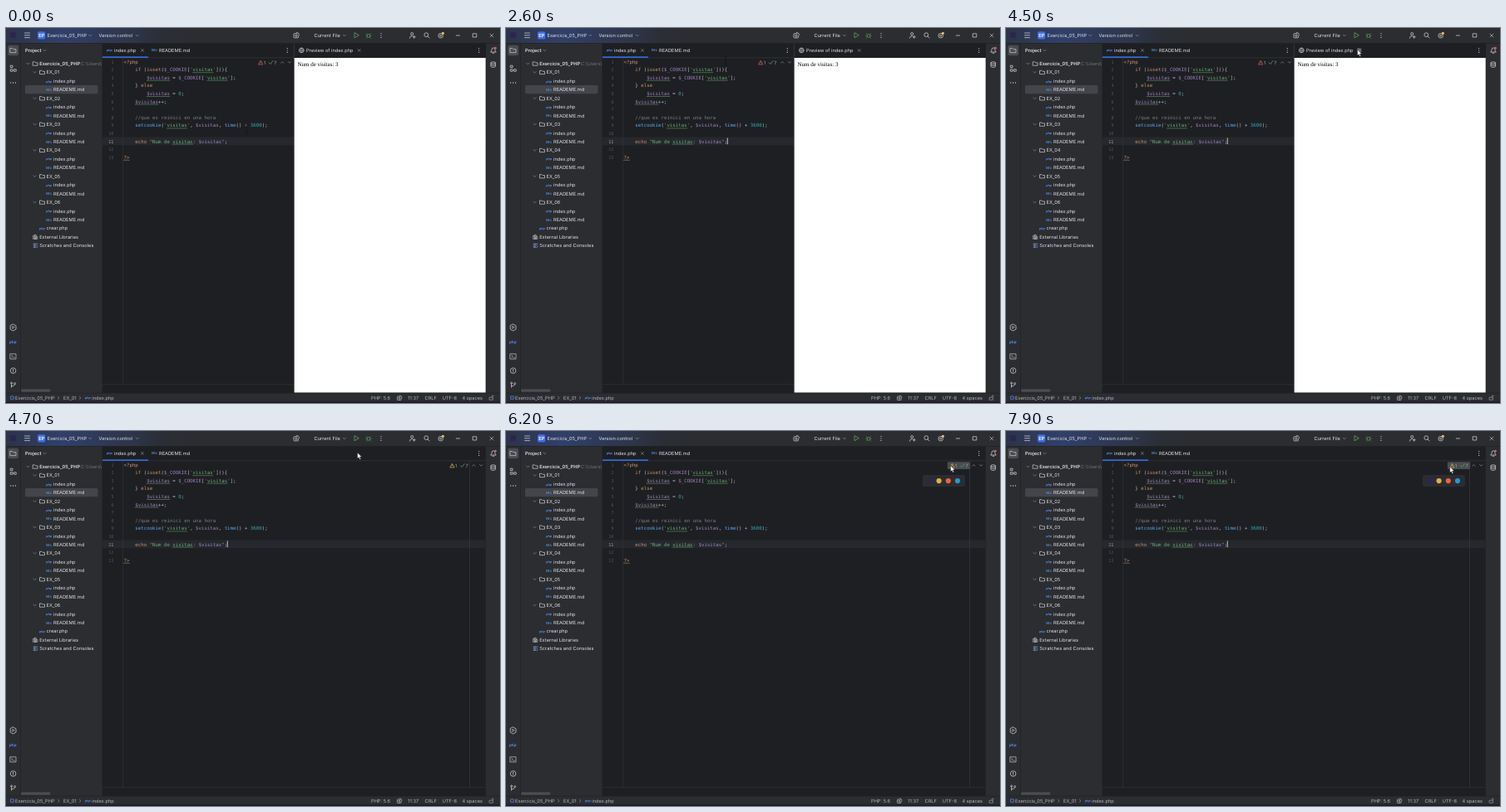
An HTML page that plays this animation: 594x452 px, repeating every 8000 ms.

```html
<!DOCTYPE html>
<html lang="ca">
<head>
<meta charset="utf-8">
<title>Editor with preview</title>
<style>
html, body { margin: 0; width: 100%; height: 100%; overflow: hidden; background: #2b2d30; }
svg { display: block; width: 594px; height: 452px; }
text { white-space: pre; text-rendering: geometricPrecision; }
.ui { font: 5.7px Inter, "Open Sans", sans-serif; }
.code { font: 5.75px "DejaVu Sans Mono", "Noto Sans Mono", monospace; }
.page { font: 7px "Liberation Serif", "Noto Serif", serif; }
</style>
</head>
<body>
<svg id="stage" viewBox="0 0 594 452" xmlns="http://www.w3.org/2000/svg"></svg>
<script>
const LOOP = 8000;
const TEXT = '#dfe1e5', PALE = '#ced0d6', GREY = '#9da0a8', DIM = '#6f737a', BLUE = '#548af7';
const EDITOR = '#1e1f22', PANEL = '#2b2d30';
const COL = 3.462, CODE_X = 141.5, LINE_H = 9.6;

const rect = (x, y, w, h, fill, extra = '') =>
  `<rect x="${x}" y="${y}" width="${w}" height="${h}" fill="${fill}" ${extra}/>`;
const path = (d, color = PALE, width = 0.75, extra = '') =>
  `<path d="${d}" fill="none" stroke="${color}" stroke-width="${width}" stroke-linecap="round" stroke-linejoin="round" ${extra}/>`;
const dot = (x, y, r, fill, extra = '') => `<circle cx="${x}" cy="${y}" r="${r}" fill="${fill}" ${extra}/>`;
const ring = (x, y, r, color = PALE) => dot(x, y, r, 'none', `stroke="${color}" stroke-width=".75"`);
const escapeText = s => s.replace(/&/g, '&amp;').replace(/</g, '&lt;');
// Text is placed by its vertical centre.
const label = (x, y, s, fill = TEXT, extra = '') =>
  `<text class="ui" x="${x}" y="${y + 2.05}" fill="${fill}" ${extra}>${escapeText(s)}</text>`;
const group = (s, id) => `<g id="${id}">${s}</g>`;

const chevron = (x, y, dir = 1) => path(`M${x - 1.6} ${y - 0.8 * dir}l1.6 ${1.6 * dir} 1.6 ${-1.6 * dir}`, GREY, 0.6);
const arrowRight = (x, y) => path(`M${x - 0.8} ${y - 1.5}l1.6 1.5 -1.6 1.5`, GREY, 0.6);
const cross = (x, y, r = 1.4, color = GREY) =>
  path(`M${x - r} ${y - r}l${2 * r} ${2 * r}m0 ${-2 * r}l${-2 * r} ${2 * r}`, color, 0.6);
const dots = (x, y, vertical = true) => [-2.4, 0, 2.4].map(d =>
  vertical ? dot(x, y + d, 0.6, PALE) : dot(x + d * 1.2, y, 0.65, PALE)).join('');
const folder = (x, y, s = 1) =>
  path(`M${x - 2.8 * s} ${y - 2.1 * s}h${2.1 * s}l${s} ${s}h${2.5 * s}v${3.3 * s}h${-5.6 * s}z`, PALE, 0.7);
const phpMark = (x, y, size = 3.7) => label(x, y - 0.4, 'php', BLUE, `style="font-size:${size}px;font-weight:700;font-style:italic"`);
const mdMark = (x, y) => label(x, y - 0.4, 'M↓', '#4d8fe0', 'style="font-size:4.2px;font-weight:600"');
const globe = (x, y) => ring(x, y, 2.8) + path(`M${x - 2.8} ${y}h5.6M${x} ${y - 2.8}q-2.6 2.8 0 5.6q2.6 -2.8 0 -5.6`, PALE, 0.5);
const listener = (x, y) =>
  path(`M${x + 1} ${y - 2.3}h-3q-1 0 -1 1v3.2q0 1 1 1h3.6q1 0 1 -1v-1.6M${x + 0.6} ${y - 3.6}q3 .2 3 3`, PALE, 0.75) +
  ring(x, y + 0.3, 1.2);

function header() {
  return rect(0, 0, 594, 18, 'url(#glow)') +
    rect(5.2, 5.2, 6.6, 6.6, '#2b2650') +
    path('M22.5 6h6M22.5 8.8h6M22.5 11.6h6') +
    rect(38, 4.2, 9.2, 9.2, '#3f6fe8', 'rx="1.6"') +
    label(39.2, 8.8, 'EP', '#fff', 'style="font-weight:600"') +
    label(49.5, 8.8, 'Exercicis_05_PHP') + chevron(101.3, 9) +
    label(111.5, 8.8, 'Version control') + chevron(157.8, 9) +
    listener(349, 9) + label(370.5, 8.8, 'Current File') + chevron(407, 9) +
    path('M419 6v5.8l5 -2.9z', '#57965c', 0.9) +
    dot(436, 9.4, 1.9, 'none', 'stroke="#57965c" stroke-width=".8"') +
    path('M433.2 6.6l1.3 1.2M438.8 6.6l-1.3 1.2M432.8 9.4h1.3M437.9 9.4h1.3M433.2 12.2l1.3 -1.2M438.8 12.2l-1.3 -1.2', '#57965c', 0.7) +
    dots(451, 9) +
    ring(488.2, 7, 1.5) + path('M485.3 12.2q0 -2.7 3 -2.7M490.7 9.2v3.2M489.1 10.8h3.2') +
    ring(505.3, 8.2, 2.4) + path('M507.1 10l2 2') +
    ring(522.7, 9.2, 2.8) + ring(522.7, 9.2, 1) + dot(525.4, 6.3, 1.5, '#f2c55c') +
    path('M541.3 9h4.2') + path('M561.6 6.8h4.2v4.2h-4.2z') + cross(584, 9, 2, PALE);
}

function sideBars() {
  return rect(0, 18, 594, 0.6, EDITOR) + rect(17.3, 18, 0.6, 422, EDITOR) +
    rect(2.2, 20.8, 12.8, 12.4, '#4a4c52', 'rx="2.2"') + folder(8.6, 27, 1.2) +
    path('M5.6 45.2h2.4v2.4h-2.4zM5.6 49.8h2.4v2.4h-2.4zM9.8 49.8h2.4v2.4h-2.4z') + dots(8.6, 66, false) +
    path('M8.6 357l3.4 1.9v4.2l-3.4 1.9 -3.4 -1.9v-4.2z') + path('M7.7 359.7v2.6l2.2 -1.3z', PALE, 0.6) +
    phpMark(4, 378.8, 4.5) +
    path('M5.2 392.8h6.8v6.2h-6.8zM6.8 394.5l1.3 1.2 -1.3 1.2M8.8 397.2h1.5', PALE, 0.65) +
    ring(8.6, 413, 3.3) + path('M8.6 411.3v2M8.6 414.6v.1', PALE, 0.8) +
    ring(6.6, 428, 1) + ring(10.6, 428.6, 1) + path('M6.6 429v4.2M6.6 431.6q4 0 4 -2') +
    path('M583 28.8q1 -1 1 -2.6q0 -2.3 2 -2.3t2 2.3q0 1.6 1 2.6zM585.2 30.3h1.6') + dot(588.4, 24.2, 1.4, '#db5c5c') +
    path('M583 42v4.2q0 1.2 2.8 1.2t2.8 -1.2v-4.2q0 -1.2 -2.8 -1.2t-2.8 1.2q0 1.2 2.8 1.2t2.8 -1.2M583 44.2q0 1.1 2.8 1.1t2.8 -1.1');
}

function tree() {
  let out = label(23, 26.8, 'Project', TEXT, 'style="font-weight:600"') + chevron(46.5, 27) +
    rect(23, 69, 87.5, 10.3, '#43454a', 'rx="1.6"');
  let row = 0;
  const nextY = () => 43 + 10.44 * row++;
  let y = nextY();
  out += chevron(26.3, y) + folder(35.3, y) +
    label(40.2, y, 'Exercicis_05_PHP', TEXT, 'style="font-weight:600"') +
    label(90, y, 'C:\\Users\\', DIM, 'clip-path="url(#treeClip)"');
  for (let i = 1; i <= 6; i++) {
    y = nextY();
    out += chevron(34.5, y) + folder(43.7, y) + label(48.5, y, 'EX_0' + i);
    y = nextY();
    out += phpMark(48.2, y) + label(57, y, 'index.php');
    y = nextY();
    out += mdMark(48.2, y) + label(57, y, 'READEME.md');
  }
  y = nextY();
  out += phpMark(40, y) + label(48.6, y, 'crear.php');
  y = nextY();
  out += path(`M33 ${y - 1.5}h1.6v4h-1.6zM34.6 ${y - 2.5}h1.6v5h-1.6zM36.2 ${y - 0.5}h1.6v3h-1.6z`, PALE, 0.6) +
    label(40.2, y, 'External Libraries');
  y = nextY();
  out += path(`M33.2 ${y - 2}h3M33.2 ${y}h2M33.2 ${y + 2}h2`, PALE, 0.7) + ring(36.6, y + 1.1, 1.4, BLUE) +
    path(`M37 ${y - 2.2}h1.3`, BLUE) + label(40.2, y, 'Scratches and Consoles');
  return out + rect(18.2, 435.4, 35, 3.2, '#4b4d51');
}

// Each token is [text, colour key, underlined].
const INK = { k: '#cb9272', v: '#9f80c2', s: '#6aab73', f: '#57aaf7', n: '#2aacb8', c: '#7a7e85', d: '#bcbec4' };
const V = ['visitas', 's', 1], VAR = ['$visitas', 'v', 1], Q = ["'", 's'];
const SOURCE = [
  [['<?php', 'k']],
  [['    if ', 'k'], ['(', 'd'], ['isset', 'k'], ['(', 'd'], ['$_COOKIE', 'v'], ['[', 'd'], Q, V, Q, ['])){', 'd']],
  [['        ', 'd'], VAR, [' = ', 'd'], ['$_COOKIE', 'v'], ['[', 'd'], Q, V, Q, ['];', 'd']],
  [['    } ', 'd'], ['else', 'k']],
  [['        ', 'd'], VAR, [' = ', 'd'], ['0', 'n'], [';', 'd']],
  [['    ', 'd'], VAR, ['++;', 'd']],
  [],
  [['    //que es reinici en una hora', 'c']],
  [['    setcookie', 'f'], ['(', 'd'], Q, V, Q, [', ', 'd'], ['$visitas', 'v'], [', ', 'd'], ['time', 'f'],
    ['() + ', 'd'], ['3600', 'n'], [');', 'd']],
  [],
  [['    echo ', 'k'], ['"Num de ', 's'], V, [': ', 's'], ['$visitas', 'v'], ['"', 's'], [';', 'd']],
  [],
  [['?>', 'k', 1]]
];

function code() {
  let out = '';
  SOURCE.forEach((tokens, i) => {
    const y = 40.6 + i * LINE_H, base = y + 1.9;
    out += `<text class="code" x="129.5" y="${base}" text-anchor="end" fill="${i === 10 ? '#a1a3ab' : '#4f545e'}" style="font-size:5.2px">${i + 1}</text>`;
    let col = 0;
    for (const [s, ink, underlined] of tokens) {
      const x = CODE_X + col * COL;
      out += `<text class="code" x="${x}" y="${base}" fill="${INK[ink]}">${escapeText(s)}</text>`;
      if (underlined) out += path(`M${x} ${y + 3.5}h${s.length * COL}`, ink === 'k' ? '#8a8068' : '#5d8a63', 0.65);
      col += s.length;
    }
  });
  return out;
}

function inspections(x, warn) {
  return path(`M${x} 43.6l2.5 -4.4 2.5 4.4zM${x + 2.5} 40.9v1`, warn, 0.75) + label(x + 6, 41.5, '1', GREY) +
    path(`M${x + 12.5} 41.8l1.7 1.7 3 -3.8`, '#57965c', 0.9) + label(x + 18.6, 41.5, '7', GREY) +
    chevron(x + 28.5, 41.4, -1) + chevron(x + 37.2, 41.4);
}

function editor() {
  return rect(115.6, 18.6, 461.2, 421.4, EDITOR) +
    rect(115.6, 35.6, 461.2, 0.6, '#393b40') +
    rect(116, 34.4, 55, 1.5, '#3574f0') +
    phpMark(121, 26.8) + label(130, 26.8, 'index.php') + cross(164, 26.9) +
    mdMark(175, 26.8) + label(184, 26.8, 'READEME.md') +
    rect(116, 131.6, 460.6, 9.6, '#26282e') + rect(140.3, 36, 0.6, 393, '#313438') +
    rect(116, 429, 460.6, 0.6, '#313438') + code();
}

function previewPane() {
  return rect(346.2, 18.6, 230.6, 17.2, EDITOR) + rect(345.9, 18.6, 0.8, 421, '#393b40') +
    dots(338.3, 27) + inspections(303.7, '#c9605c') +
    globe(355.3, 26.9) + label(361, 26.8, 'Preview of index.php') +
    dot(424.7, 27, 3, '#5a5d63', 'id="closeHover"') + cross(424.7, 27) +
    rect(346.7, 36, 230, 403.5, '#fff') +
    '<text class="page" x="350.4" y="45.7" fill="#000">Num de visitas: 3</text>';
}

function widePane() {
  const popup = rect(501, 53, 51, 14, PANEL, 'rx="2"') + rect(505.8, 57, 6.2, 6.2, '#2b2650') +
    dot(520.6, 60.1, 3.1, '#dfb04a') + dot(531.8, 60.1, 3.1, '#ec6240') + dot(543, 60.1, 3.1, '#2796cf');
  return rect(557.3, 36, 0.6, 393, '#393b40') +
    group(rect(530.8, 37.2, 27.4, 8.8, '#4a4d4f', 'rx="1.5"'), 'widgetHover') +
    inspections(534, '#c9a24e') + group(popup, 'popup');
}

function statusBar() {
  const y = 445.8, t = (x, s) => label(x, y, s, '#b4b8bf');
  return rect(0, 439.8, 594, 0.6, EDITOR) + rect(0, 450.6, 594, 1.4, '#201524') +
    path('M6 443.9h3.2v3.4h-3.2z', BLUE, 0.75) + t(11, 'Exercicis_05_PHP') + arrowRight(63.3, y) +
    t(69, 'EX_01') + arrowRight(89.2, y) + phpMark(95, y) + t(103.3, 'index.php') +
    t(439, 'PHP: 5.6') + `<g transform="translate(473 446) scale(.85)">${listener(0, 0)}</g>` +
    t(483.2, '11:37') + t(503.5, 'CRLF') + t(524.7, 'UTF-8') + t(548.5, '4 spaces') +
    path('M581.5 445.2h4v3h-4zM584.4 445v-1.1q0 -1 1 -1t1 1', GREY, 0.65);
}

const stage = document.getElementById('stage');
stage.innerHTML = `<defs>
  <linearGradient id="glow" gradientUnits="userSpaceOnUse" x1="0" x2="220" y1="0" y2="0">
    <stop offset="0" stop-color="#2d3448"/><stop offset=".3" stop-color="#313f6a"/>
    <stop offset=".7" stop-color="#2d3549"/><stop offset=".85" stop-color="#2b2e36"/>
    <stop offset="1" stop-color="${PANEL}"/>
  </linearGradient>
  <clipPath id="treeClip"><rect x="18" y="36" width="97.6" height="400"/></clipPath>
</defs>` + rect(0, 0, 594, 452, PANEL) + header() + sideBars() + tree() + editor() +
  group(previewPane(), 'preview') + dots(568.7, 27) + group(widePane(), 'wide') + statusBar() +
  rect(265.8, 132.4, 0.9, 7.8, PALE, 'id="caret"') +
  group(path('M-2 -5.5q2 0 2 1.2v8.6q0 1.2 -2 1.2M2 -5.5q-2 0 -2 1.2v8.6q0 1.2 2 1.2', '#17181a', 0.6), 'beam') +
  '<path id="arrow" d="M0 0v7.3l1.7 -1.5 1.2 2.7 1.3 -.6 -1.2 -2.6h2.3z" fill="#fff" stroke="#111" stroke-width=".5"/>';

const part = Object.fromEntries(['preview', 'wide', 'closeHover', 'widgetHover', 'popup', 'caret', 'beam', 'arrow']
  .map(id => [id, document.getElementById(id)]));
const show = (el, on) => el.setAttribute('display', on ? 'inline' : 'none');

// Pointer stops: time, x, y.
const STOPS = [
  [0, 289, 122], [1300, 289, 122], [2000, 264, 40], [3400, 264, 40], [3700, 335, 14], [4000, 412, 4],
  [4200, 422.5, 26], [4700, 422.5, 26], [5000, 478, 40], [5400, 532.8, 41.3], [6000, 532.8, 41.3],
  [6700, 541.4, 43.2], [6900, 541.4, 43.2], [7400, 538, 43], [7600, 538, 43], [7900, 533.7, 43]
];

function pointerAt(t) {
  const i = STOPS.findIndex(s => s[0] > t);
  if (i < 0) return STOPS[STOPS.length - 1].slice(1);
  const [t0, x0, y0] = STOPS[i - 1], [t1, x1, y1] = STOPS[i];
  const u = (t - t0) / (t1 - t0), e = u * u * (3 - 2 * u);
  return [x0 + (x1 - x0) * e, y0 + (y1 - y0) * e];
}

function render(time) {
  const t = Math.floor(time / 100) * 100;
  const [x, y] = pointerAt(t);
  const closed = t >= 4700;
  const onWidget = closed && x > 530 && y > 36;
  const arrow = y < 36 || onWidget;
  show(part.preview, !closed);
  show(part.wide, closed);
  show(part.closeHover, t >= 4300);
  show(part.popup, t >= 5000);
  show(part.widgetHover, onWidget);
  // Closing the preview restarts the blink.
  show(part.caret, closed ? Math.floor((t - 4700) / 500) % 2 === 0 : Math.floor(t / 500) % 2 === 1);
  show(part.arrow, arrow);
  show(part.beam, !arrow);
  part[arrow ? 'arrow' : 'beam'].setAttribute('transform', `translate(${x} ${y})`);
}

const start = performance.now();
function tick() {
  render((performance.now() - start) % LOOP);
  requestAnimationFrame(tick);
}
tick();
</script>
</body>
</html>
```
